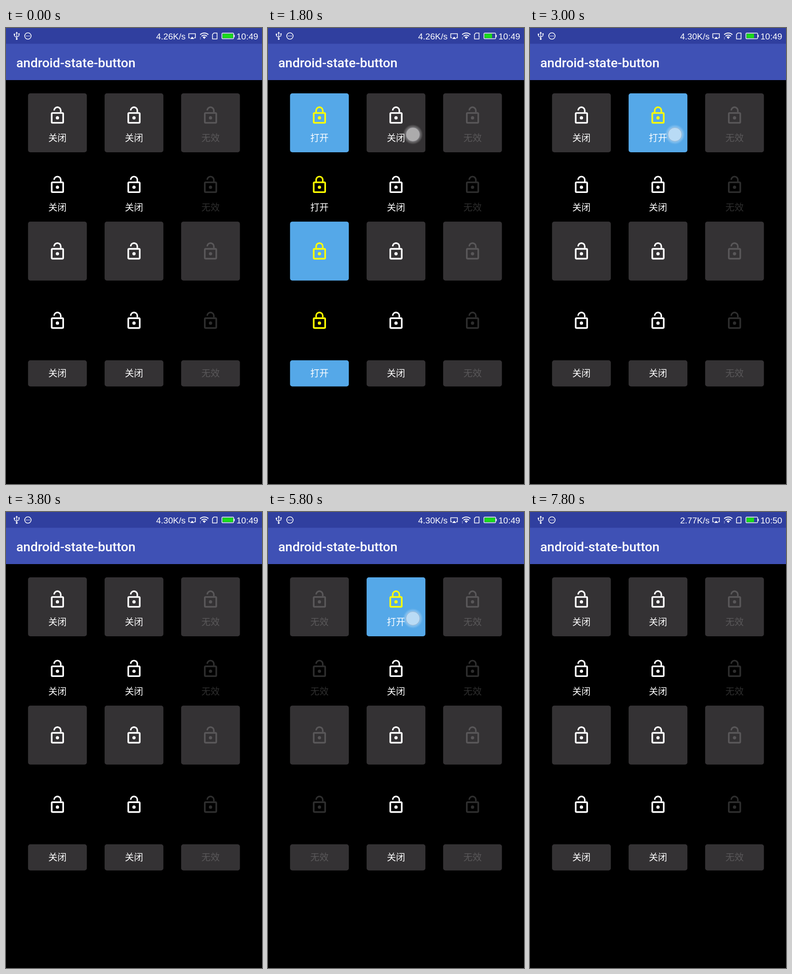
Animation, 561 px wide and 998 px high, one loop 8000 ms. Source, as an HTML page:

```html
<!DOCTYPE html>
<html lang="zh">
<head>
<meta charset="utf-8">
<style>
html, body { margin: 0; width: 100%; height: 100%; overflow: hidden; background: #000; }
svg { display: block; width: 561px; height: 998px; }
.title { font: 500 28.4px Roboto, sans-serif; }
.status { font: 19px "Liberation Sans", Arial, sans-serif; }
.label { font: 20px "Noto Sans CJK SC", "Noto Sans CJK", sans-serif; text-anchor: middle; }
.line { fill: none; stroke: #fff; stroke-width: 1.6; }
</style>
</head>
<body>
<svg viewBox="0 0 561 998" fill="#fff">
  <defs>
    <radialGradient id="glow">
      <stop offset=".66" stop-color="#fff" stop-opacity=".36"/>
      <stop offset="1" stop-color="#fff" stop-opacity="0"/>
    </radialGradient>
  </defs>
  <rect width="561" height="115" fill="#3f51b5"/>
  <rect width="561" height="34.5" fill="#303f9f"/>
  <rect y="114" width="561" height="884" fill="#000"/>
  <text class="title" x="22.5" y="86">android-state-button</text>

  <g class="line">
    <path d="M23.5 10v13M18.5 14v3.5l5 3.5M28.500 13v4l-5 3" stroke-width="1.4"/>
    <circle cx="48" cy="17.500" r="7"/>
    <path d="M403.500 21.500h-3v-9h14.500v9h-3"/>
    <path d="M425.500 14.500a13 13 0 0 1 18 0M428.500 18a8.500 8.500 0 0 1 12 0" stroke-width="2"/>
    <path d="M452.500 14l3-3h7v13h-10z" stroke-linejoin="round"/>
    <rect x="473.200" y="11.200" width="25.600" height="12.300" rx="1.500" stroke-width="1.400"/>
  </g>
  <path d="M23.500 8l2.500 4h-5zM17 12.500h3v3h-3zM403.500 24l4.500-5 4.500 5zM431 20a5 5 0 0 1 7 0l-3.500 4zM499.500 15h1.700v5h-1.700z"/>
  <path d="M425 20h2v1.300h-2zM425 23h2v1.300h-2z" opacity=".7"/>
  <circle cx="23.500" cy="24" r="2"/><circle cx="28.500" cy="13" r="1.600"/>
  <circle cx="44.700" cy="17.500" r="1"/><circle cx="48" cy="17.500" r="1"/><circle cx="51.300" cy="17.500" r="1"/>
  <rect id="charge" x="474.500" y="12.500" height="9.700" fill="#1adb1a"/>
  <text id="speed" class="status" x="329" y="24.500"></text>
  <text id="clock" class="status" x="505" y="24.500"></text>

  <g id="buttons"></g>
  <g id="touch">
    <circle r="22" fill="url(#glow)"/>
    <circle r="15" fill-opacity=".36" stroke="#778" stroke-opacity=".35"/>
  </g>
</svg>
<script>
const $ = id => document.getElementById(id);
const LOOP = 8000;
const columns = [112.7, 280.5, 448.2];
// Panel top and height, icon top, label baseline
const rows = [
  { top: 143, height: 129, icon: 169.8, text: 248 },
  { icon: 321.6, text: 400 },
  { top: 423.7, height: 129, icon: 467.2 },
  { icon: 619 },
  { top: 727.2, height: 57.300, text: 763.300 }
];
const looks = {
  off: { label: '关闭', icon: '#fff', panel: '#343234', alpha: 1 },
  on: { label: '打开', icon: '#ff0', panel: '#55a8e8', alpha: 1 },
  invalid: { label: '无效', icon: '#fff', panel: '#343234', alpha: .18 }
};
const touches = [
  [1800, 2200, 0], [3000, 3400, 0], [4600, 5000, 0],
  [5800, 6200, 0], [6400, 6800, 1], [7400, 7800, 1]
];
const spots = [[317.5, 233], [297.5, 369.500]];
const charging = '101010110110110110110';

const within = (t, from, to) => t >= from && t < to;

function lock(x, y, color, closed) {
  return `<g transform="translate(${x - 21.500} ${y}) scale(1.793)" fill="none" stroke="${color}" stroke-width="2">
    <rect x="5" y="9" width="14" height="12" rx="1"/>
    <path d="M7.950 ${closed ? '8V6' : '6'}a4.050 4.050 0 0 1 8.100 0v2" stroke-width="1.900"/>
    <circle cx="12" cy="15" r="2" fill="${color}" stroke="none"/></g>`;
}

function button(x, row, state) {
  const look = looks[state];
  let out = '';
  if (row.top) out += `<rect x="${x - 64.400}" y="${row.top}" width="128.800" height="${row.height}" rx="5" fill="${look.panel}"/>`;
  out += `<g opacity="${look.alpha}">`;
  if (row.icon) out += lock(x, row.icon, look.icon, state === 'on');
  if (row.text) out += `<text class="label" x="${x}" y="${row.text}">${look.label}</text>`;
  return out + '</g>';
}

function stateAt(t, col, row) {
  if (col === 2) return 'invalid';
  if (col === 0) return within(t, 1000, 3000) ? 'on' : within(t, 5000, 7000) ? 'invalid' : 'off';
  const on = row === 0 ? within(t, 2000, 3200) || within(t, 4800, 6000)
    : row === 1 && within(t, 6600, 7600);
  return on ? 'on' : 'off';
}

let shown = '';
function draw(now) {
  const t = now % LOOP;
  const states = rows.map((_, r) => columns.map((_, c) => stateAt(t, c, r)));
  if (shown !== states.join()) {
    shown = states.join();
    $('buttons').innerHTML = rows.map((row, r) =>
      columns.map((x, c) => button(x, row, states[r][c])).join('')).join('');
  }
  $('speed').textContent = t < 2000 ? '4.26K/s' : t < 6000 ? '4.30K/s' : '2.77K/s';
  $('clock').textContent = t < 6000 ? '10:49' : '10:50';
  $('charge').setAttribute('width', charging[Math.floor((t + 200) / 400)] === '1' ? 23 : 16.500);

  const touch = touches.find(([from, to]) => within(t, from, to));
  $('touch').style.display = touch ? '' : 'none';
  if (touch) $('touch').setAttribute('transform', `translate(${spots[touch[2]]})`);
}

const start = performance.now();
function tick() {
  draw(performance.now() - start);
  requestAnimationFrame(tick);
}
tick();
</script>
</body>
</html>
```
